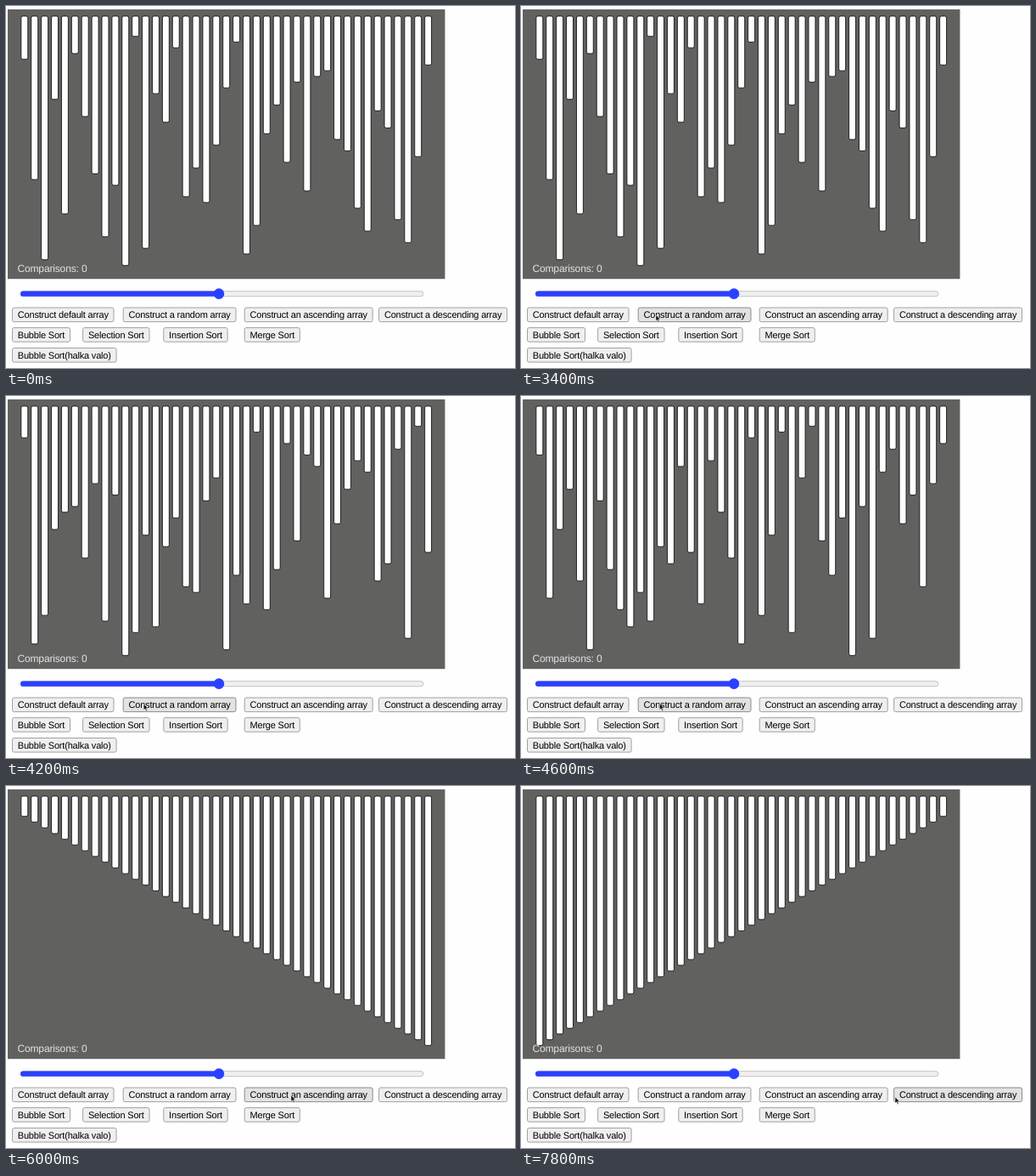
Write an HTML page that moves like this. It is 600 by 426 pixels and loops after 8000 ms.

```html
<!DOCTYPE html>
<html lang="en">
<head>
<meta charset="utf-8">
<title>Sorting visualizer</title>
<style>
  html, body { margin: 0; width: 100%; height: 100%; overflow: hidden; background: #fefefe; }
  svg { display: block; width: 600px; height: 426px; }
  text { font-family: "Liberation Sans", Arial, sans-serif; text-rendering: geometricPrecision; letter-spacing: -.19px; }
  .bar { fill: #fefefe; stroke: #000; }
  .button rect { fill: #efefef; stroke: #989898; stroke-width: .9; }
  .button.hover rect { fill: #e2e2e2; stroke: #808080; }
  .button text { font-size: 11px; }
</style>
</head>
<body>
<svg viewBox="0 0 600 426">
  <g id="canvas" transform="translate(2 4) scale(.793)">
    <rect width="650" height="400" fill="#616160"/>
  </g>
  <text x="13.4" y="313.4" font-size="12.1" fill="#e2e2e2">Comparisons: 0</text>
  <rect x="17.4" y="335.7" width="474.5" height="6" rx="3" fill="#efefef" stroke="#b8b8b8" stroke-width=".8"/>
  <rect x="17" y="335.5" width="234" height="6.3" rx="3.1" fill="#2a40ff"/>
  <circle cx="251" cy="338.6" r="6.3" fill="#2a40ff"/>
  <g id="buttons"></g>
  <path id="cursor" d="M0 0V7.2L1.7 5.7L2.9 8.4L4.1 7.9L2.9 5.2H5.2Z" fill="#111" stroke="#eee" stroke-width=".5"/>
</svg>
<script>
const LOOP = 8000, TICK = 200, BUTTON_HEIGHT = 16.6, PADDING = 6.3;

const defaultArray = [4, 25, 39, 11, 31, 3, 14, 24, 35, 26, 40, 0, 37, 10, 15, 2, 28, 23, 29, 19, 9,
  1, 38, 33, 17, 12, 22, 8, 27, 7, 6, 18, 20, 30, 34, 13, 16, 32, 36, 21, 5];
const ascending = [...defaultArray.keys()];
const descending = [...ascending].reverse();

function shuffled(seed) {
  const values = [...ascending];
  for (let i = values.length - 1; i > 0; i--) {
    seed = (seed * 16807) % 2147483647;
    const j = seed % (i + 1);
    [values[i], values[j]] = [values[j], values[i]];
  }
  return values;
}

const arrays = [
  { start: 0, values: defaultArray },
  { start: 3600, values: shuffled(1234) },
  { start: 4000, values: shuffled(5678) },
  { start: 4400, values: shuffled(9101) },
  { start: 6000, values: ascending },
  { start: 7600, values: descending }
];

// Pointer moves; dip bends the way downwards.
const entry = { x: 480, y: 197 };
const moves = [
  { start: 400, end: 1400, x: 63.5, y: 364, dip: 0 },
  { start: 2600, end: 3400, x: 159, y: 363.5, dip: 4 },
  { start: 3400, end: 4600, x: 163.5, y: 362, dip: 0 },
  { start: 4800, end: 6000, x: 336, y: 364, dip: 22 },
  { start: 6800, end: 7800, x: 441, y: 366, dip: 1 }
];

const buttonRows = [
  { top: 355, items: { "Construct default array": 7.5, "Construct a random array": 138.2,
    "Construct an ascending array": 281.2, "Construct a descending array": 439.6 } },
  { top: 378.6, items: { "Bubble Sort": 7.5, "Selection Sort": 90.6, "Insertion Sort": 185.8, "Merge Sort": 281.2 } },
  { top: 402.5, items: { "Bubble Sort(halka valo)": 7.5 } }
];

const byId = id => document.getElementById(id);
function add(parent, tag, attributes) {
  const node = document.createElementNS("http://www.w3.org/2000/svg", tag);
  for (const name in attributes) node.setAttribute(name, attributes[name]);
  return parent.appendChild(node);
}

const bars = ascending.map(i =>
  add(byId("canvas"), "rect", { class: "bar", x: 20 + 15 * i, y: 10, width: 10, rx: 2.5 }));

function addButton(label, left, top) {
  const group = add(byId("buttons"), "g", { class: "button" });
  const box = add(group, "rect", { x: left, y: top, height: BUTTON_HEIGHT, rx: 2 });
  const text = add(group, "text", { x: left + PADDING, y: top + 12 });
  text.textContent = label;
  const width = text.getComputedTextLength() + 2 * PADDING;
  box.setAttribute("width", width);
  const contains = (x, y) => x >= left && x <= left + width && y >= top && y <= top + BUTTON_HEIGHT;
  return { group, contains };
}
const buttons = buttonRows.flatMap(({ top, items }) =>
  Object.entries(items).map(([label, left]) => addButton(label, left, top)));

function pointerAt(time) {
  let { x, y } = entry;
  for (const move of moves) {
    const t = Math.min(1, Math.max(0, (time - move.start) / (move.end - move.start)));
    const eased = t * t * (3 - 2 * t);
    x += (move.x - x) * eased;
    y += (move.y - y) * eased + move.dip * Math.sin(Math.PI * t);
  }
  return [x, y];
}

let shownArray;
function draw(now) {
  const time = Math.floor(now % LOOP / TICK) * TICK;
  const { values } = arrays.findLast(({ start }) => start <= time);
  if (values !== shownArray) {
    bars.forEach((bar, i) => bar.setAttribute("height", 30 + 8.5 * values[i]));
    shownArray = values;
  }
  const [x, y] = time < moves[0].start ? [-20, -20] : pointerAt(time);
  byId("cursor").setAttribute("transform", `translate(${x} ${y})`);
  for (const { group, contains } of buttons) group.classList.toggle("hover", contains(x, y));
}

let origin;
function frame(now) {
  origin ??= now;
  draw(now - origin);
  requestAnimationFrame(frame);
}
draw(0);
requestAnimationFrame(frame);
</script>
</body>
</html>
```
